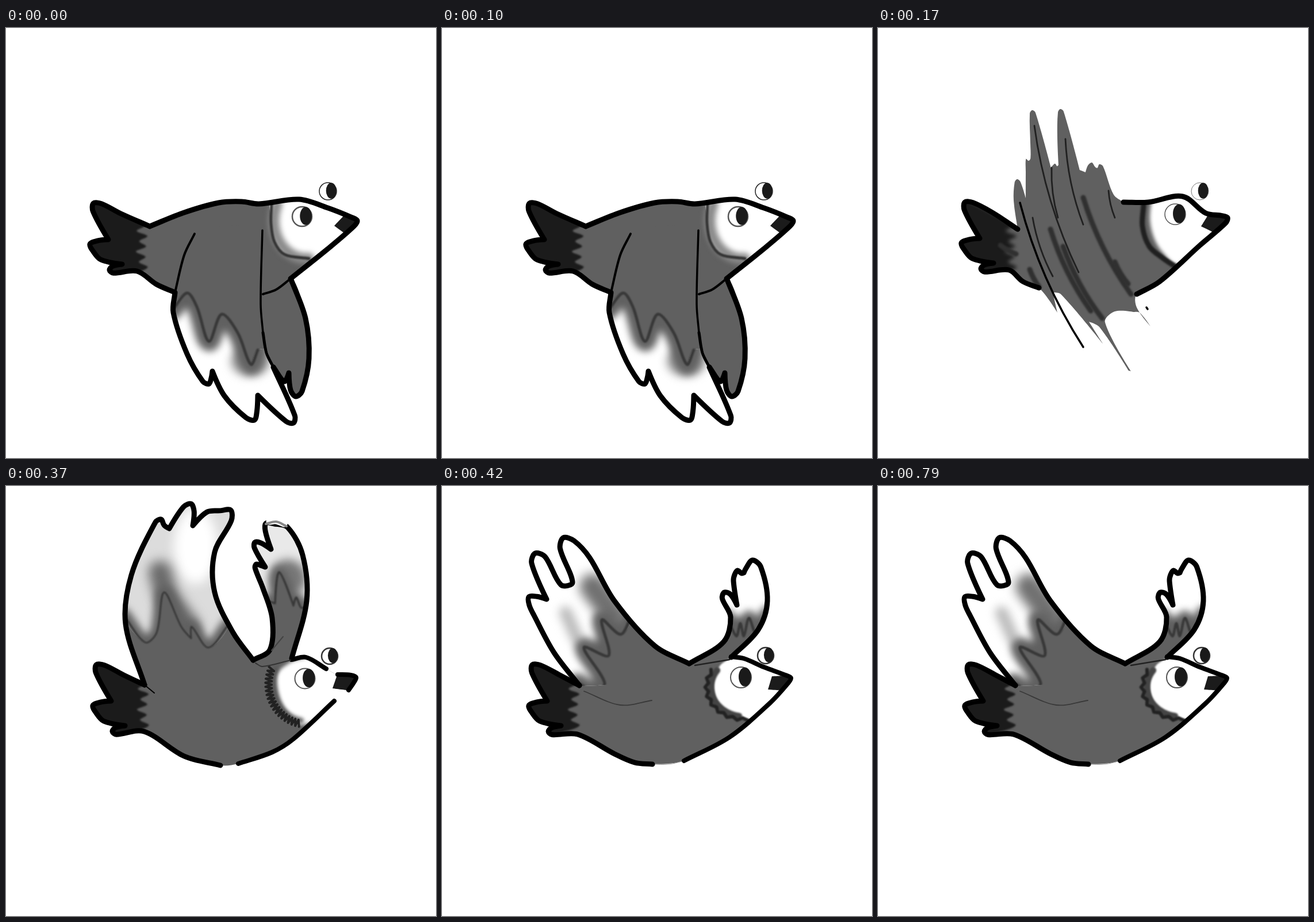
An HTML page that plays this animation: 748 px wide and 748 px high, repeating every 1040 ms.

```html
<!DOCTYPE html>
<html lang="en">
<head>
<meta charset="utf-8">
<title>Flapping bird</title>
<style>
  html, body { margin: 0; width: 100%; height: 100%; overflow: hidden; background: #fff; }
  svg { display: block; width: 100vw; height: 100vh; }
  path { fill: none; stroke-linecap: round; stroke-linejoin: round; }
</style>
</head>
<body>
<svg id="stage" viewBox="0 0 748 748"></svg>
<script>
const GREY = '#606060', DARK = '#1b1b1b';

// Key points are "x y"; "!" makes a sharp corner, "^r" a rounded feather tip.
const parse = text => text.split(',').map(s => {
  const [x, y, r] = s.match(/[\d.]+/g).map(Number);
  return { x, y, r, sharp: s.includes('!') };
});

// Turns each tip into three points, facing away from its neighbours.
function roundTips(points) {
  return points.flatMap((p, i) => {
    if (!p.r) return [p];
    const a = points[i - 1], b = points[i + 1];
    const dx = p.x - (a.x + b.x) / 2, dy = p.y - (a.y + b.y) / 2;
    const k = p.r / Math.hypot(dx, dy), ux = dx * k, uy = dy * k;
    const side = Math.sign((a.x - b.x) * uy - (a.y - b.y) * ux);
    const edge = s => ({ x: p.x - ux + s * uy, y: p.y - uy - s * ux });
    return [edge(side), p, edge(-side)];
  });
}

function curve(text, closed) {
  const p = roundTips(parse(text)), n = p.length;
  const at = i => closed ? p[(i + n) % n] : p[Math.max(0, Math.min(n - 1, i))];
  const handle = (i, dir) => {
    const a = at(i - 1), b = at(i), c = at(i + 1);
    if (b.sharp) return `${b.x} ${b.y}`;
    const prev = Math.hypot(b.x - a.x, b.y - a.y), next = Math.hypot(c.x - b.x, c.y - b.y);
    const k = dir * (dir > 0 ? next : prev) / (3 * (prev + next) || 1);
    return `${b.x + (c.x - a.x) * k} ${b.y + (c.y - a.y) * k}`;
  };
  let d = `M${p[0].x} ${p[0].y}`;
  for (let i = 0; i < (closed ? n : n - 1); i++) {
    const q = at(i + 1);
    d += `C${handle(i, 1)} ${handle(i + 1, -1)} ${q.x} ${q.y}`;
  }
  return d;
}

const soft = b => b ? ` filter="url(#blur${b})"` : '';
const stroke = (d, w, color, b) => `<path d="${d}" stroke="${color}" stroke-width="${w}"${soft(b)}/>`;
const line = (pts, w = 9, color = '#000', b = 0) => stroke(curve(pts), w, color, b);
const fill = (pts, color, b) => `<path d="${curve(pts, true)}" style="fill:${color}"${soft(b)}/>`;
const oval = (x, y, rx, ry, color, b, more = '') =>
  `<ellipse cx="${x}" cy="${y}" rx="${rx}" ry="${ry}" fill="${color}"${soft(b)} ${more}/>`;

let clips = 0;
function inside(pts, content) {
  const id = 'clip' + clips++;
  return `<clipPath id="${id}"><path d="${curve(pts, true)}"/></clipPath><g clip-path="url(#${id})">${content}</g>`;
}

const eye = (x, y, r, w, ink = '#555') =>
  oval(x, y, r, r, '#fff', 0, `stroke="${ink}" stroke-width="${w}"`) + oval(x + r * 0.38, y - 1, r * 0.6, r * 0.92, '#1a1a1a');

const tail = (dx, dy) => parse('180 421^6,202 411!,165 403,146 376^10,178 368!,152 305^10,200 323')
  .map(p => `${p.x + dx} ${p.y + dy}${p.sharp ? '!' : ''}${p.r ? '^' + p.r : ''}`).join();

// Dark tail ink with a ragged right edge.
function tailInk(x, blur) {
  let edge = '';
  for (let i = 0; i < 11; i++) edge += `,${x + (i % 2 ? 8 : -7) + 3 * Math.sin(i * 5)} ${335 + i * 9}`;
  return fill('120 450!,120 280!,205 325' + edge, DARK, blur);
}

// Pale feather end beyond the fringe, shaded towards it.
const plume = (wing, fringe, outer, pale, shade, ink, extra = '') =>
  inside(wing, inside(`${fringe},${outer}`,
    oval(374, 374, 600, 600, pale) + extra + line(fringe, shade, GREY, 8))
    + line(fringe, ink, '#383838', 1));

// Scribbled band around the face, from angle a down to angle b.
function collar(x, y, rx, ry, a, b, steps, depth, w, color, blur) {
  let d = '';
  for (let i = 0; i <= steps; i++) {
    const t = (a + (b - a) * i / steps) * Math.PI / 180, k = 1 + (i % 2 ? -depth : depth / 3);
    d += `${i ? 'L' : 'M'}${x + rx * k * Math.cos(t)} ${y + ry * k * Math.sin(t)}`;
  }
  return stroke(d, w, color, blur);
}

// Brush stroke from one point to another, sagging to its left.
const sweep = (x, y, x2, y2, w, color, b) => stroke(
  `M${x} ${y}Q${(x + x2) / 2 - (y2 - y) * 0.08} ${(y + y2) / 2 + (x2 - x) * 0.08} ${x2} ${y2}`, w, color, b);

function wingsDown() {
  const back = '250 345,310 321,370 304,410 302,440 306,510 298,560 313,611 335^8,560 384,495 436';
  const belly = '294 460,262 446,228 423';
  const rear = `${belly},${tail(0, 0)},250 345`;
  const far = '495 435,521 505,527 575,504 641^10,492 600!,484 615,465 590';
  const feathers = '294 460,291 495,315 567,353 619^8,359 597!,380 640,432 682^11,438 639!,500 687^9,465 590';
  const wing = `328 358,298 435,${feathers},447 530,444 430,446 352`;
  const body = `${back},447 463,${rear}`;
  return fill(far + ',440 560,444 463', GREY) + line(far)
    + fill(body, GREY)
    + inside(body, tailInk(236, 2)
      + fill('462 300,461 330,466 370,484 394,527 402,620 400,620 290', '#fff')
      + collar(522, 335, 56, 66, 205, 85, 30, 0, 19, '#8a8a8a', 6)
      + line('462 305,461 340,467 372,485 394,527 401', 5, '#333', 1)
      + fill('571 344!,589 325!,630 330!,590 358!', DARK))
    + line(rear) + line(back) + line('495 436,470 455,447 463', 4)
    + fill(wing, GREY)
    + plume(wing, '290 490,315 461,332 485,353 545,375 498,403 530,426 585,438 560',
      '480 560!,530 720!,260 720!', '#fff', 34, 5, oval(425, 580, 34, 26, '#999', 10))
    + line('328 358,310 395,294 460', 4) + line(feathers)
    + line('465 590,453 565,447 530', 5) + line('447 530,443 480,446 352', 3.5)
    + eye(515, 328, 17, 2.5) + eye(560, 284, 15, 1.5, '#222');
}

function wingsBlurred() {
  const spikes = '243 350,236 300,242 263^5,257 296!,257 250,262 231^4,265 200,268 143^5,301 243!,308 236^4,314 238!,312 190,317 141^5,351 247!,361 251!,372 234^6,379 243!,385 237^5,410 290,427 303';
  const face = '427 303,470 303,530 293,570 322,608 330^7,560 378,490 441,450 463';
  const drips = '450 486,474 519!,455 495,445 494!,412 493,395 512,440 597!,436 596!,385 520,367 511!,391 549!,318 463,304 460!,312 495!';
  const rear = `280 452,252 441,228 421,${tail(-1, -2)},243 350`;
  const body = `${spikes},${face},${drips},${rear}`;
  const smears = [[357, 295, 440, 463], [412, 407, 435, 445], [300, 350, 370, 492], [322, 380, 390, 505], [264, 420, 280, 450], [213, 378, 240, 393]];
  const streaks = [[272, 170, 349, 425], [302, 243, 313, 330], [326, 193, 357, 342], [269, 330, 304, 432], [401, 283, 412, 330]];
  return fill(body, GREY)
    + inside(body, tailInk(231, 4)
      + fill('484 290,473 325,479 362,495 390,523 411,640 350,560 280', '#fff', 4)
      + line('462 308,460 345,472 380,495 400,517 415', 9, '#202020', 2)
      + fill('562 345!,575 324!,625 326!,589 358!', DARK)
      + smears.map(s => sweep(...s, 9, '#303030', 2)).join(''))
    + line(rear) + line(face)
    + streaks.map(s => sweep(...s, 2.8, '#202020')).join('')
    + sweep(247, 304, 357, 555, 3.5, '#000')
    + line('467 486,469 489', 3.5)
    + eye(517, 324, 18, 1.5) + eye(560, 284, 15, 1, '#777');
}

function wingsUp() {
  const wing = '241 346,208 240,218 155,270 58^8,284 74!,322 31^10,325 69!,350 45,391 42^13,363 115,363 185,395 255,430 303';
  const far = '430 303,459 285,463 230,447 178,435 136^5,451 141!,433 98^7,461 110!,452 65^10,490 72,516 120,523 200,497 300';
  const face = '497 302,522 298,557 318', beak = '577 328,609 333^7,596 355';
  const chest = '571 374,500 440,463 463,404 483';
  const rear = `373 486,310 470,240 427,${tail(5, 6)},241 346`;
  const body = `${wing},${far},${face},${beak},${chest},${rear}`;
  return fill(body, GREY)
    + inside(body, tailInk(238, 2)
      + fill('500 304!,473 325,474 360,488 391,518 415,650 350!,560 290!', '#fff', 4)
      + collar(524, 345, 60, 64, 204, 100, 30, 0, 9, '#555', 4)
      + collar(522, 345, 68, 72, 204, 100, 38, 0.12, 4, '#222')
      + fill('568 352!,577 326!,615 328!,599 356!', DARK))
    + plume(wing, '205 225,242 272,262 255,275 185,305 245,322 265!,323 245,352 281,388 240',
      '420 0!,180 0!', '#dcdcdc', 24, 3,
      oval(330, 105, 38, 65, '#fff', 12) + line('268 150,280 190,318 245', 40, '#6a6a6a', 12))
    + plume(far, '448 198,468 204!,475 150,500 208!,505 194,514 212,528 204',
      '550 40!,415 40!', '#e9e9e9', 20, 3.5, oval(490, 160, 32, 32, '#777', 10))
    + line('571 374,594 356', 4, '#fff')
    + line(wing) + line(far)
    + line('458 62,470 61,484 66', 11, '#fff') + line('452 66,470 62,488 70', 4, '#888')
    + line(face, 8) + line(beak, 8) + line(chest, 8) + line(rear)
    + line('241 346,258 360', 2) + line('434 308,446 314,495 303', 2, '#333') + line('462 286,482 262', 2, '#444')
    + eye(520, 335, 17.5, 2) + eye(563, 296, 14, 2.5, '#333');
}

function glide() {
  const wing = '239 347,195 290,160 225,151 193^10,182 197!,162 117^13,207 172,227 168,211 90^14,257 125,300 200,370 278,430 309';
  const far = '430 309,490 271,502 228,491 185^8,513 207!,507 165,514 147^6,525 151!,540 129^13,566 200,550 250,503 298';
  const face = '503 297,525 300,560 315,607 334^7,570 378,500 437,421 478';
  const rear = `366 484,335 481,300 466,236 432,${tail(5, 6)},239 347`;
  const body = `${wing},${far},${face},${rear}`;
  return fill(body, GREY)
    + inside(body, tailInk(229, 2)
      + fill('505 298!,484 312,473 338,477 370,494 390,537 405,650 350!,560 290!', '#fff', 2)
      + collar(527, 350, 59, 51, 215, 100, 30, 0, 11, '#444', 2)
      + collar(525, 350, 66, 57, 212, 84, 16, 0.06, 6, '#222', 1)
      + fill('567 354!,574 331!,620 329!,597 356!', DARK))
    + plume(wing, '330 224,311 258,278 233,290 295,247 281,283 343,262 355,236 342',
      '150 350!,100 210!,180 60!,270 60!', '#fff', 32, 5,
      line('262 175,300 225', 45, '#707070', 12) + line('215 220,235 265', 22, '#bbb', 10))
    + plume(far, '496 228,512 261,519 239,525 261,534 230,547 258,566 222',
      '600 100!,470 100!', '#fff', 26, 4.5)
    + line('366 484,395 484,421 478', 1, '#999')
    + line(wing) + line(far) + line(face, 8) + line(rear)
    + line('247 357,310 381,365 373', 1.8, '#393939') + line('440 312,500 302', 2.5, '#222')
    + eye(520, 333, 18, 2) + eye(563, 295, 14, 2.5, '#333');
}

const poses = [[wingsDown, 170], [wingsBlurred, 120], [wingsUp, 130], [glide, 620]];
const loop = poses.reduce((sum, [, ms]) => sum + ms, 0);
const stage = document.getElementById('stage');

stage.innerHTML = '<defs>' + [1, 2, 4, 6, 8, 10, 12].map(b =>
  `<filter id="blur${b}" filterUnits="userSpaceOnUse" x="0" y="0" width="748" height="748" color-interpolation-filters="sRGB"><feGaussianBlur stdDeviation="${b * 0.8}"/></filter>`
).join('') + '</defs>' + poses.map(([draw]) => `<g class="pose" opacity="0">${draw()}</g>`).join('');

let start = 0;
stage.querySelectorAll('.pose').forEach((pose, i) => {
  const end = start + poses[i][1];
  const key = (opacity, ms) => ({ opacity, offset: ms / loop, easing: 'step-end' });
  const keys = [key(1, start), key(end < loop ? 0 : 1, end)];
  if (start > 0) keys.unshift(key(0, 0));
  if (end < loop) keys.push(key(0, loop));
  pose.animate(keys, { duration: loop, iterations: Infinity });
  start = end;
});
</script>
</body>
</html>
```
